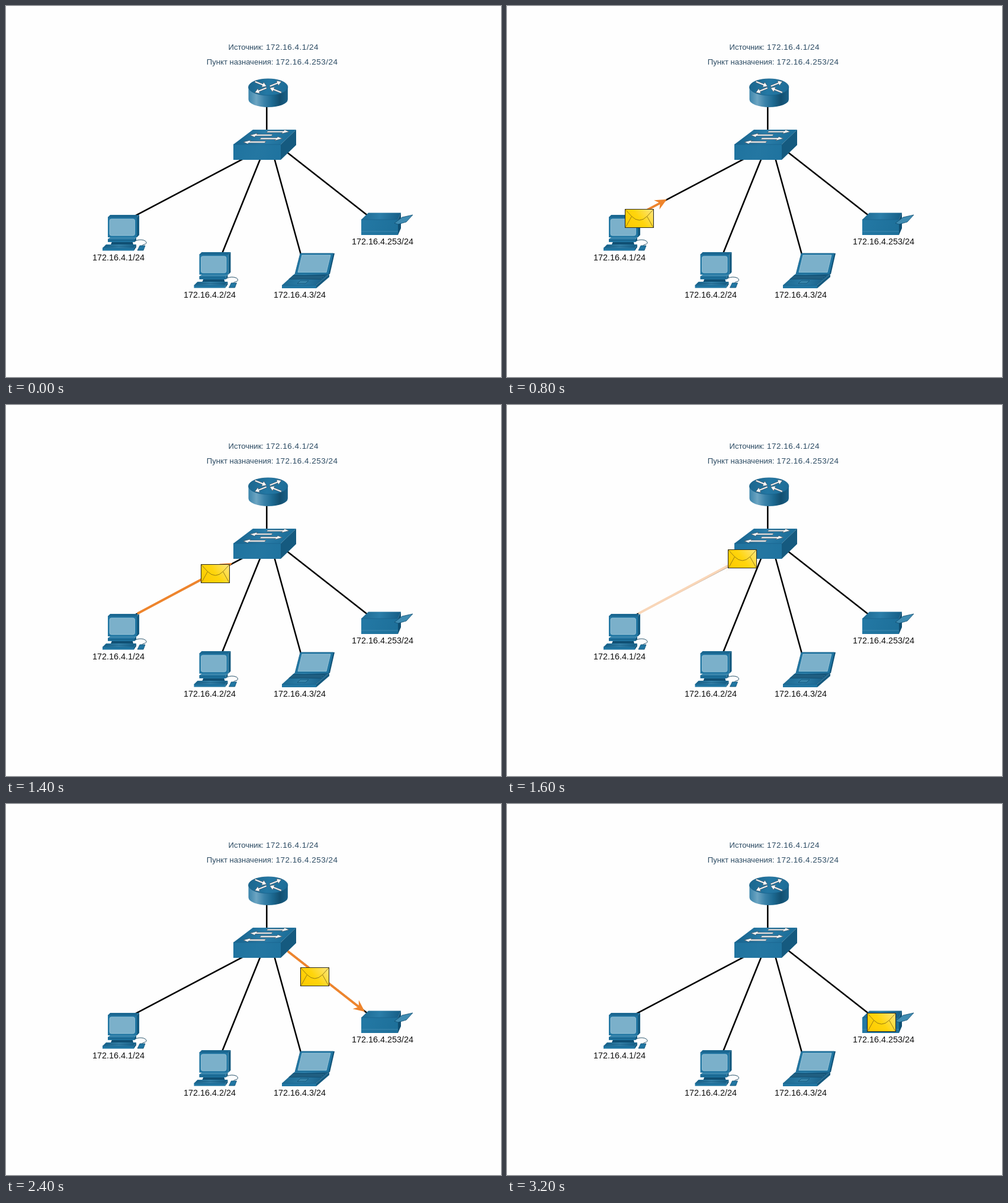
Write an HTML page with a canvas that moves like this. It is 836 by 627 pixels and loops after 3600 ms.

```html
<!DOCTYPE html>
<html lang="ru">
<head>
<meta charset="utf-8">
<style>
html, body { margin: 0; width: 100%; height: 100%; overflow: hidden; background: #fefefe; }
canvas { display: block; }
</style>
</head>
<body>
<canvas id="stage" width="836" height="627"></canvas>
<script>
const ctx = document.getElementById('stage').getContext('2d');
const LOOP = 3600, BEAT = 200;
const HELD = [5, 9, 11, 13, 17]; // beats that repeat the pose before them
const PAPER = '#fefefe', BLUE = '#2176a2', DARK = '#155a7f', EDGE = '#0f4f73';
const GLASS = '#7bb0ca', ORANGE = '#ee842c', INK = '#2b4a62';

// Envelope centre at key times
const ROUTE = [
  { t: 685, x: 198, y: 373 },
  { t: 1600, x: 397, y: 260 },
  { t: 2000, x: 465, y: 252 },
  { t: 3172, x: 632, y: 369 }
];
const ARROWS = [
  { x1: 222, y1: 352.5, x2: 382, y2: 267, start: 650, fade: 1400 },
  { x1: 476, y1: 249, x2: 606, y2: 351, start: 1850, fade: 2450 }
];

const clamp = v => Math.max(0, Math.min(1, v));
const mix = (a, b, p) => a + (b - a) * p;

function paint(fill, stroke, width = 0.8) {
  if (fill) { ctx.fillStyle = fill; ctx.fill(); }
  if (stroke) { ctx.strokeStyle = stroke; ctx.lineWidth = width; ctx.stroke(); }
}

function shape(points, fill, stroke, width) {
  ctx.beginPath();
  points.forEach(p => ctx.lineTo(...p));
  ctx.closePath();
  paint(fill, stroke, width);
}

function line(x1, y1, x2, y2, color = '#000', width = 2.6) {
  ctx.beginPath();
  ctx.moveTo(x1, y1);
  ctx.lineTo(x2, y2);
  paint(null, color, width);
}

function gradient(x1, y1, x2, y2, ...colors) {
  const g = ctx.createLinearGradient(x1, y1, x2, y2);
  colors.forEach((c, i) => g.addColorStop(i / (colors.length - 1), c));
  return g;
}

// Quad standing on x, y whose upper corners lean by left and right
function slant(x, y, w, h, left, right, fill, stroke) {
  shape([[x, y], [x + left, y - h], [x + w + right, y - h], [x + w, y]], fill, stroke);
}

// Oblique box: front face at x, y, with a lid and a right side
function box(x, y, w, h, left, right, depth, front = BLUE, lid = '#1b6891', side = DARK) {
  const r = x + w;
  slant(x, y, w, depth, left, right, lid);
  shape([[r, y], [r + right, y - depth], [r + right, y - depth + h], [r, y + h]], side);
  shape([[x, y], [r, y], [r, y + h], [x, y + h]], front);
  line(x, y, r, y, '#17608a', 0.7);
}

// White arrow centred on x, y
function whiteArrow(x, y, len, angle, head, wing, skew = 0) {
  const end = len / 2, neck = end - head;
  ctx.save();
  ctx.translate(x, y);
  ctx.rotate(angle);
  ctx.transform(1, 0, skew, 1, 0, 0);
  const half = [[-end, 1.3], [neck, 1.3], [neck, wing], [end, 0]];
  const mirror = half.map(([a, b]) => [a, -b]).reverse();
  shape([...half, ...mirror], '#fff', '#4b5560', 0.6);
  ctx.restore();
}

function router(x, y) {
  const rx = 33.2;
  ctx.beginPath();
  ctx.ellipse(x, y + 21, rx, 13, 0, Math.PI, 0, true);
  ctx.lineTo(x + rx, y);
  ctx.lineTo(x - rx, y);
  paint(gradient(x - rx, 0, x + rx, 0, '#3a84ab', '#6da5c2', '#3a82a9', '#1d6a92', '#124f70', '#1a6188'));
  ctx.beginPath();
  ctx.ellipse(x, y, rx, 14, 0, 0, 7);
  paint(gradient(x - rx, y - 7, x + rx, y + 7, '#1a658d', '#2478a4', '#1d6c96'), '#17608a');
  // one diagonal points in, the other out
  for (const sx of [-1, 1]) for (const sy of [-1, 1]) {
    const inward = sx === sy ? -1 : 1;
    whiteArrow(x + 12.5 * sx, y + 5.3 * sy, 21, Math.atan2(0.4 * sy * inward, sx * inward), 7, 4.5);
  }
}

function hub(x, y) {
  box(x, y, 80, 26, 33, 26, 25,
    gradient(x, y, x + 80, y + 24, '#1f739f', '#2477a2', '#1f739f'),
    gradient(x + 16, y - 25, x + 86, y, '#196690', '#2b7eaa', '#1d6f9a'));
  for (let i = 0; i < 4; i++) {
    const back = i % 2;
    whiteArrow(x + 75.5 - 5.7 * i - 23 * back, y - 21.5 + 5.8 * i, 37, Math.PI * back, 10, 3.2, -0.8);
  }
}

function desktop(x, y) {
  ctx.save();
  ctx.translate(x, y);
  ctx.beginPath();
  ctx.moveTo(54, 46);
  ctx.bezierCurveTo(61, 41, 74, 43, 74, 48);
  ctx.bezierCurveTo(74, 52, 66, 50, 67, 54);
  paint(null, '#28536b', 1);
  slant(59, 61, 10, 8, 4, 3, BLUE, EDGE);
  slant(14, 51, 38, 12, 5, -3, EDGE);
  box(9, 42, 45, 5, 4, 3, 3, BLUE, '#3e8ab0');
  line(9, 44.5, 54, 44.5, EDGE, 0.7);
  box(0, 57, 53, 4.5, 6, 4, 6, BLUE, gradient(0, 51, 55, 57, '#17628a', '#3683aa', '#17628a'));
  line(4, 54, 54, 54, EDGE, 0.7);
  box(9, 5, 49, 34, 4, 4, 4);
  ctx.beginPath();
  ctx.roundRect(12, 8, 42.5, 28, 3);
  paint(GLASS, '#9cc6da');
  ctx.restore();
}

function laptop(x, y) {
  slant(x + 25, y - 19, 56, 35, 8, 8, EDGE);
  slant(x + 22, y - 19, 57, 35, 9, 8, BLUE, '#17608a');
  slant(x + 27, y - 22, 48, 29, 7, 7, GLASS, '#a4cbdc');
  box(x, y, 58, 5, 21, 22, 19, BLUE, gradient(x, y - 17, x + 70, y, '#1b688f', '#2b7ca6', '#195f87'));
  slant(x + 11, y - 10, 55, 7, 8, 8, '#124f72');
  for (const i of [1, 2]) line(x + 19 - 3 * i, y - 17 + 2.4 * i, x + 74 - 3 * i, y - 17 + 2.4 * i, '#4c91b3', 0.6);
  slant(x + 26, y - 3, 14, 5, 5, 5, '#3784aa', EDGE);
}

function printer(x, y) {
  box(x, y, 62, 26, 12, 5, 11.5,
    gradient(x, y, x + 62, y + 26, '#2479a5', '#1d6f99'),
    gradient(x, y - 11, x + 62, y, '#1c6a93', '#2b7ea9', '#17618a'), EDGE);
  line(x, y + 20, x + 62, y + 20, '#488fb4', 0.8);
  shape([[x + 56, y + 6], [x + 69, y - 4], [x + 87, y - 8], [x + 76, y + 4], [x + 62, y + 8]], '#3f8bb1', EDGE);
}

function envelope(x, y, alpha) {
  const w = 48, h = 31, fold = 12;
  ctx.save();
  ctx.globalAlpha = alpha;
  ctx.translate(Math.floor(x - w / 2) + 0.5, Math.floor(y - h / 2) + 0.5);
  ctx.beginPath();
  ctx.rect(0, 0, w, h);
  paint(gradient(4, h, w - 4, 0, '#ffca00', '#ffd50c', '#fde474'), '#2a2a20', 1.1);
  ctx.beginPath();
  ctx.moveTo(0, 0);
  ctx.lineTo(11, fold);
  ctx.quadraticCurveTo(w / 2, 25, w - 11, fold);
  ctx.lineTo(w, 0);
  paint(null, '#8d7212', 0.9);
  line(1, h - 1, 11, fold, '#8d7212', 0.9);
  line(w - 1, h - 1, w - 11, fold, '#8d7212', 0.9);
  ctx.restore();
}

function sweep({ x1, y1, x2, y2, start, fade }, t) {
  const p = clamp((t - start) / 500), alpha = clamp((fade + 300 - t) / 300);
  if (!p || !alpha) return;
  const end = Math.hypot(x2 - x1, y2 - y1) * p;
  ctx.save();
  ctx.translate(x1, y1);
  ctx.rotate(Math.atan2(y2 - y1, x2 - x1));
  // paper underlay keeps the fading stroke pale over the cable
  line(0, 0, end - 10, 0, PAPER, 3.8);
  ctx.globalAlpha = alpha;
  line(0, 0, end - 10, 0, ORANGE, 3.8);
  ctx.globalAlpha = alpha ** 3;
  shape([[end, 0], [end - 20, -9], [end - 13, 0], [end - 19, 9]], ORANGE);
  ctx.restore();
}

function position(t) {
  const next = ROUTE.findIndex(k => k.t > t);
  if (next === 0) return ROUTE[0];
  if (next < 0) return ROUTE.at(-1);
  const a = ROUTE[next - 1], b = ROUTE[next], p = (t - a.t) / (b.t - a.t);
  return { x: mix(a.x, b.x, p), y: mix(a.y, b.y, p) };
}

function text(str, x, y, size, color, align = 'left', spacing = 0) {
  ctx.font = `${size}px "Liberation Sans", Arial, sans-serif`;
  ctx.letterSpacing = spacing + 'px';
  ctx.fillStyle = color;
  ctx.textAlign = align;
  ctx.fillText(str, x, y);
}

function heading(word, address, x, y) {
  text(word, x - 4, y, 13.1, INK, 'right');
  text(address, x, y, 13.5, INK, 'left', 0.5);
}

const label = (address, x, y) => text(address, x, y, 14.4, '#111', 'center');

function draw(t) {
  ctx.fillStyle = PAPER;
  ctx.fillRect(0, 0, 836, 627);
  line(440.3, 165, 440.3, 215);
  line(400, 258.7, 216, 355.7);
  line(430, 257, 365, 418);
  line(453, 257, 498, 420);
  line(473, 246, 612, 355);
  router(442.7, 137);
  hub(384, 234);
  desktop(163, 352);
  desktop(317.5, 415);
  laptop(466, 472);
  printer(600, 361);
  heading('Источник:', '172.16.4.1/24', 439, 74);
  heading('Пункт назначения:', '172.16.4.253/24', 455.5, 99);
  label('172.16.4.1/24', 190, 430);
  label('172.16.4.2/24', 344, 493);
  label('172.16.4.3/24', 496, 493);
  label('172.16.4.253/24', 636, 403);
  ARROWS.forEach(a => sweep(a, t));
  const { x, y } = position(t);
  envelope(x, y, clamp((t - 100) / 500));
}

function tick() {
  const beat = Math.floor(performance.now() % LOOP / BEAT);
  draw((HELD.includes(beat) ? beat - 1 : beat) * BEAT);
  requestAnimationFrame(tick);
}
tick();
</script>
</body>
</html>
```
